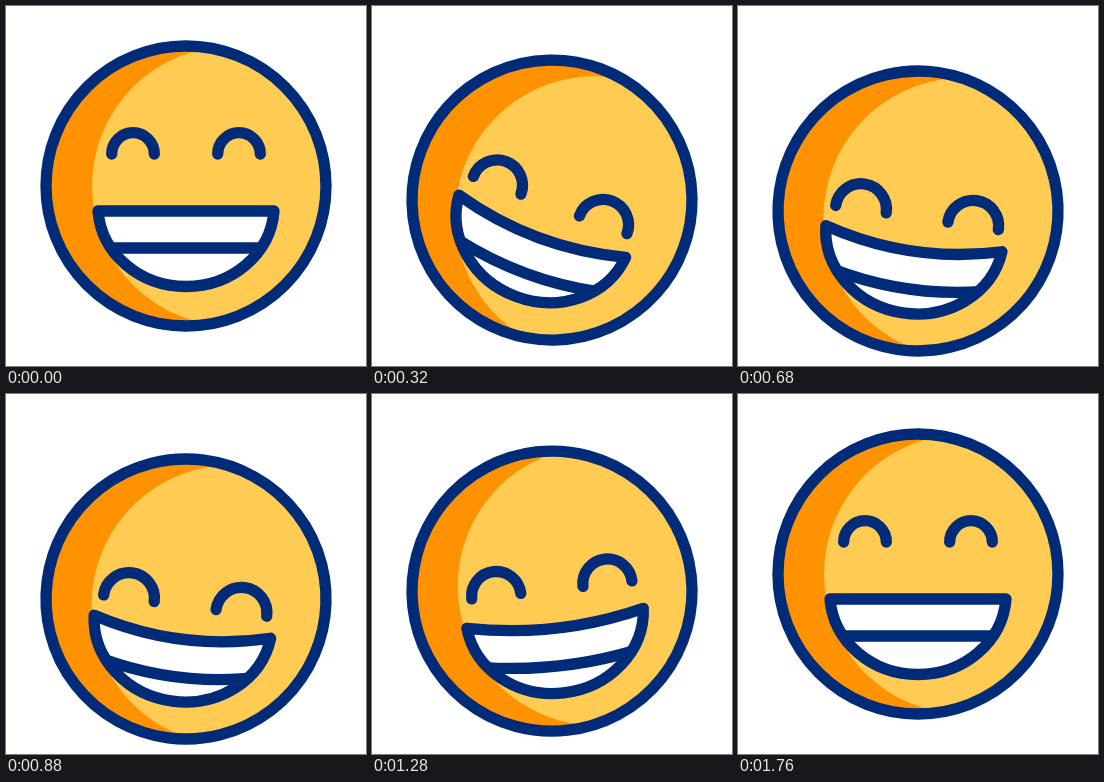
An HTML page with a canvas for the animation above (2 s loop, 360 px wide and 360 px high).

```html
<!DOCTYPE html>
<html lang="en">
<head>
<meta charset="utf-8">
<title>Laughing face</title>
<style>
html, body { margin: 0; width: 100%; height: 100%; overflow: hidden; background: #fff; }
canvas { display: block; width: 360px; height: 360px; }
</style>
</head>
<body>
<canvas id="stage"></canvas>
<script>
const canvas = document.getElementById('stage');
const ctx = canvas.getContext('2d');
const ratio = window.devicePixelRatio || 1;
canvas.width = canvas.height = 360 * ratio;

const LOOP = 2000, STEP = 40, REST = 1760;
const NAVY = '#002b78', YELLOW = '#ffcb52', ORANGE = '#ff9200';

// Each track is a list of [time, value] keys, eased in and out.
const DROP = [[0, 0], [590, 25], [1100, 25], [1580, 0]];
const LAUGH = [[0, 0], [360, 1], [1150, 1], [1600, 0]];
const TILT = [[0, 0], [330, 20.5], [690, 8.4], [1020, 6.8], [1270, -6.5], [1450, 1], [1620, 0]];

const mix = (a, b, k) => a + (b - a) * k;
const ease = u => u * u * (3 - 2 * u);

function at(track, t) {
  for (let i = 1; i < track.length; i++) {
    const [t0, a] = track[i - 1], [t1, b] = track[i];
    if (t < t1) return mix(a, b, ease((t - t0) / (t1 - t0)));
  }
  return track[track.length - 1][1];
}

function disc(x, r) {
  ctx.beginPath();
  ctx.arc(x, 0, r, 0, Math.PI * 2);
}

function drawHead() {
  ctx.fillStyle = ORANGE;
  disc(0, 140);
  ctx.fill();
  ctx.save();
  ctx.clip();
  ctx.fillStyle = YELLOW;
  disc(46, 140);
  ctx.fill();
  ctx.restore();
  disc(0, 140);
  ctx.stroke();
}

function drawEyes(k) {
  const x = mix(53, 56.7, k), y = mix(-32, 6.6, k), r = mix(21.3, 25.5, k);
  for (const side of [-1, 1]) {
    ctx.beginPath();
    ctx.arc(side * x, y, r, Math.PI, 0);
    ctx.stroke();
  }
}

function drawMouth(k) {
  const w = mix(88, 89, k), top = mix(25, 28, k), low = mix(100.5, 103, k);
  const sag = 12.5 * k, bite = mix(62, 70, k), dip = 8.5 * k;

  const mouth = new Path2D();
  mouth.moveTo(-w, top);
  mouth.quadraticCurveTo(0, top + 2 * sag, w, top);
  mouth.bezierCurveTo(w - 3.5, top + 43, 46, low, 0, low);
  mouth.bezierCurveTo(-46, low, 3.5 - w, top + 43, -w, top);
  mouth.closePath();

  ctx.fillStyle = '#fff';
  ctx.fill(mouth);
  ctx.save();
  ctx.clip(mouth);
  ctx.beginPath();
  ctx.moveTo(-76, bite);
  ctx.quadraticCurveTo(0, bite + 2 * dip, 76, bite);
  ctx.stroke();
  ctx.restore();
  ctx.stroke(mouth);
}

function draw(t) {
  const k = at(LAUGH, t);
  ctx.setTransform(ratio, 0, 0, ratio, 0, 0);
  ctx.fillStyle = '#fff';
  ctx.fillRect(0, 0, 360, 360);
  ctx.translate(180, 180 + at(DROP, t));
  ctx.rotate(at(TILT, t) * Math.PI / 180);
  ctx.strokeStyle = NAVY;
  ctx.lineWidth = 11.3;
  ctx.lineCap = ctx.lineJoin = 'round';
  drawHead();
  drawEyes(k);
  drawMouth(k);
}

const start = performance.now();
function tick() {
  const t = (performance.now() - start) % LOOP;
  draw(Math.min(Math.floor(t / STEP) * STEP, REST));
  requestAnimationFrame(tick);
}
tick();
</script>
</body>
</html>
```
